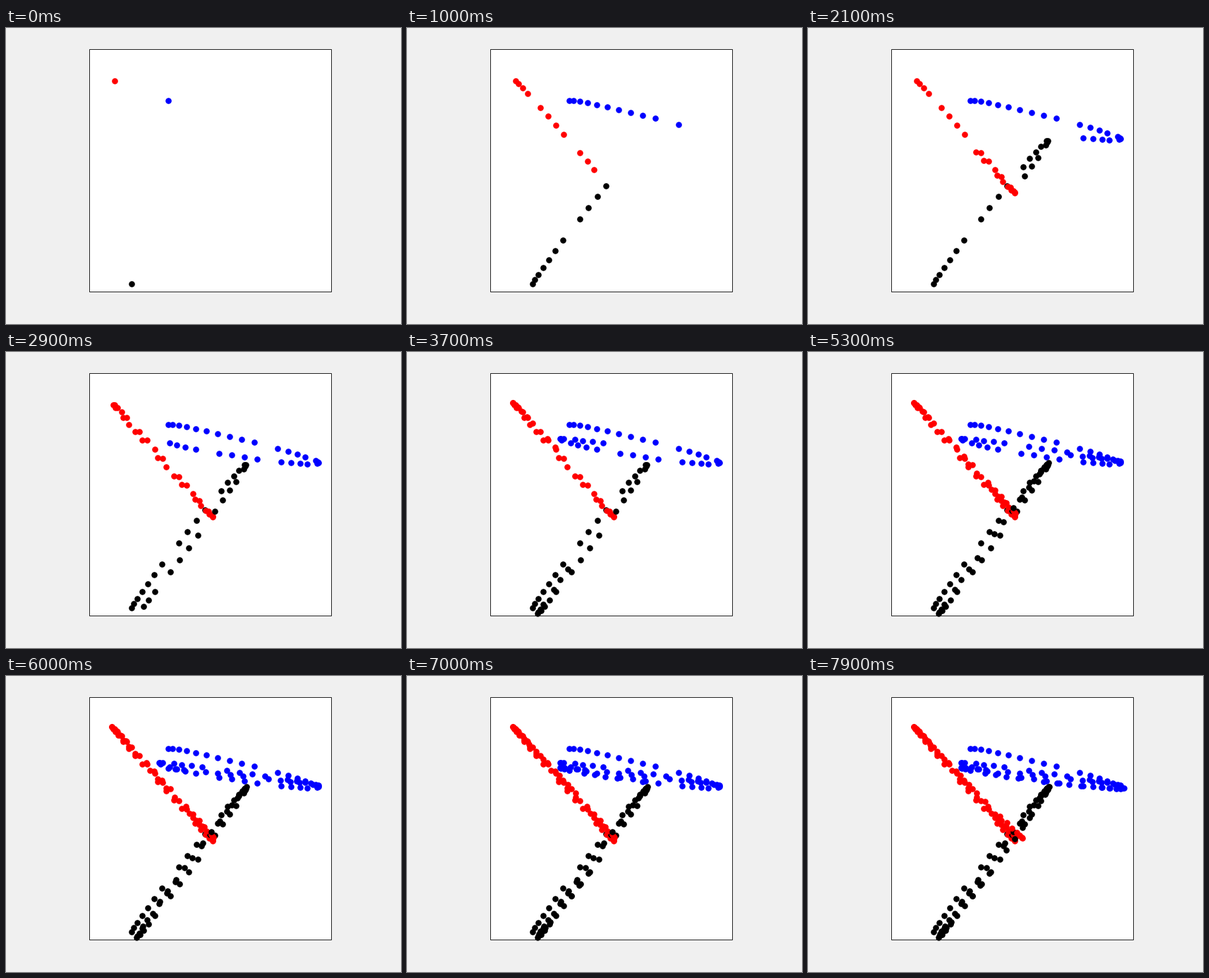
A matplotlib script that plays this animation: 560 by 420 pixels, repeating every 8 s.

```python
import numpy as np
import matplotlib.pyplot as plt
from matplotlib.animation import FuncAnimation
from matplotlib.patches import Rectangle

W, H, DPI = 560, 420, 100
FRAMES, INTERVAL = 80, 100
PX = 72 / DPI  # points per pixel

# Turning points: sample number, x, y, bow of the swing that follows
RED = [(-1.6, 152, 73, -2.5), (17.6, 293, 234, 4.5), (37.3, 150, 72, -2),
       (56.8, 294, 229, 3), (76, 151, 73, 2), (96, 304, 230, 0),
       (115, 151, 73, 0)]
BLUE = [(-1.7, 226, 103.5, -6.5), (17.7, 443, 157, 8), (37.2, 217, 123, -2.5),
        (56.7, 443, 155, -1), (76, 217, 130, 5), (95.8, 448, 159, 0),
        (115, 217, 130, 0)]
BLACK = [(-1.1, 177, 366, -10), (19.3, 340, 160, 7), (38.1, 185, 371, -4),
         (57.7, 341, 157, -4), (76.7, 186, 367, 9), (96.5, 342, 156, 0),
         (115, 186, 367, 0)]


def swing(turns, t):
    """Harmonic motion between turning points along slightly bowed lines."""
    time, x, y, bow = np.array(turns).T
    i = np.searchsorted(time, t, side="right") - 1
    phase = np.pi * (t - time[i]) / (time[i + 1] - time[i])
    ease = (1 - np.cos(phase)) / 2
    return np.column_stack([
        x[i] + (x[i + 1] - x[i]) * ease,
        y[i] + (y[i + 1] - y[i]) * ease + bow[i] * np.sin(phase),
    ])


def track(turns, first_skip):
    """One dot per frame; every fourth frame skips a sample."""
    k = np.arange(FRAMES)
    sample = k + np.maximum(0, (k - first_skip) // 4 + 1)
    return np.round(swing(turns, sample)) + 0.5


# Interleaved so later dots lie over earlier ones
dots = np.stack([track(BLACK, 7), track(BLUE, 10), track(RED, 4)], axis=1)
dots = dots.reshape(-1, 2)
colors = np.tile(["#000000", "#0000ff", "#ff0000"], FRAMES)

fig = plt.figure(figsize=(W / DPI, H / DPI), dpi=DPI, facecolor="#f0f0f0")
ax = fig.add_axes([0, 0, 1, 1])
ax.set(xlim=(0, W), ylim=(H, 0))
ax.axis("off")
# Whole coordinates: the one-pixel outline snaps to the next pixel centre
ax.add_patch(Rectangle((118, 30), 343, 344, facecolor="white",
                       edgecolor="#262626", linewidth=PX))
trail = ax.scatter(dots[:, 0], dots[:, 1], s=(8.6 * PX) ** 2, c=colors,
                   linewidths=0, clip_on=False, zorder=3)


def draw(frame):
    trail.set_offsets(dots[:3 * (frame + 1)])
    return [trail]


anim = FuncAnimation(fig, draw, frames=FRAMES, interval=INTERVAL,
                     init_func=lambda: draw(0), repeat=True, repeat_delay=0)
plt.show()
```
